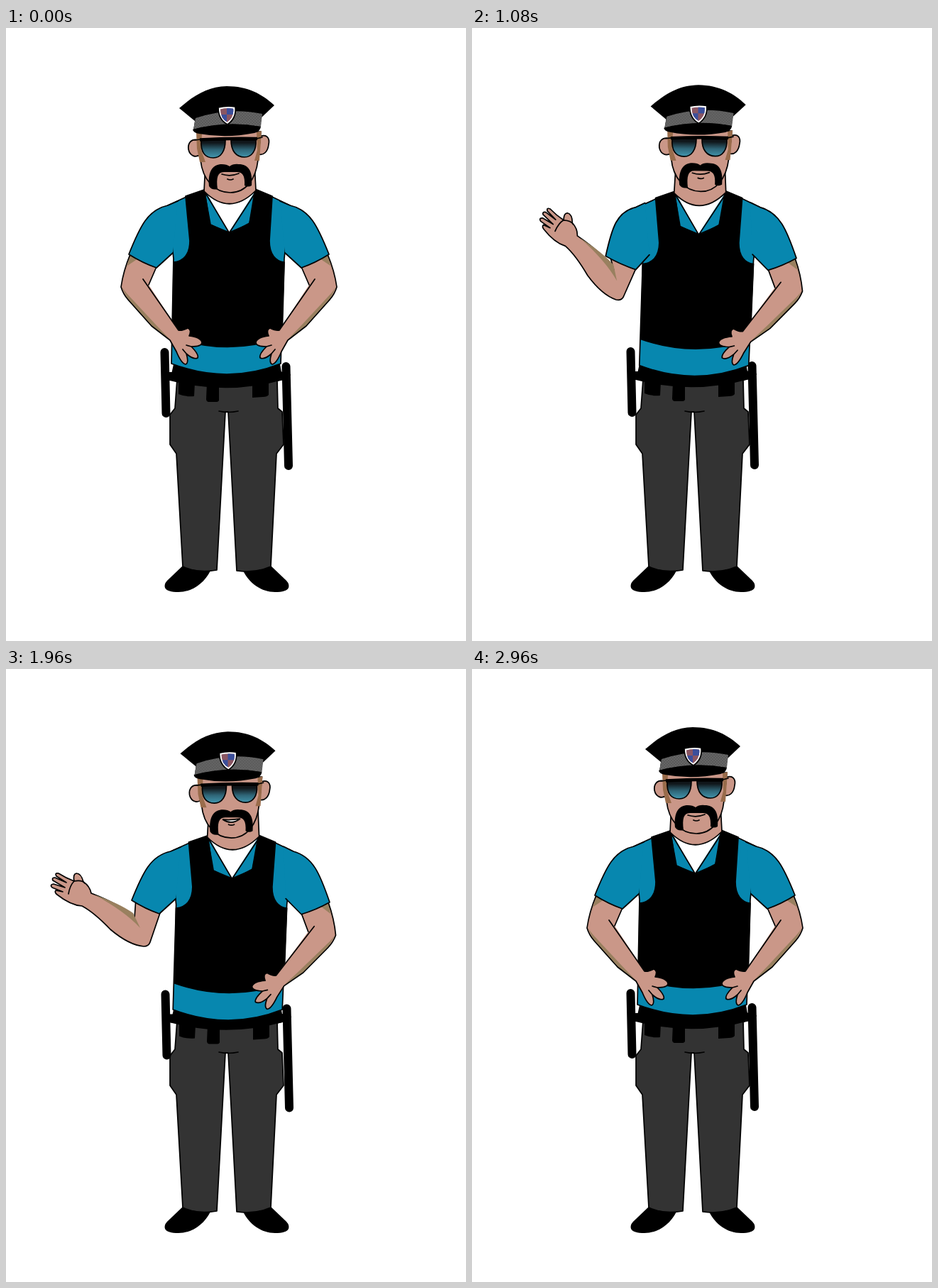
These frames come from a looping animation (648x864 px, 3 s). An HTML page:

```html
<!DOCTYPE html>
<html lang="en">
<head>
<meta charset="utf-8">
<title>Officer</title>
<style>
  html, body { margin: 0; width: 100%; height: 100%; overflow: hidden; background: #fff; }
  svg { display: block; width: 648px; height: 864px; }
  .line { stroke: #000; stroke-width: 1.7; stroke-linejoin: round; stroke-linecap: round; }
  .skin { fill: #ca9788; }
  .shade { fill: #99805f; }
  .shirt { fill: #0787af; }
  .hair { fill: #996c4b; }
  .open { fill: none; }
  .bar { stroke: #000; stroke-width: 12; stroke-linecap: round; fill: none; }
</style>
</head>
<body>
<svg viewBox="0 0 648 864">
  <defs>
    <linearGradient id="lens" x1="0" y1="0" x2="0" y2="1">
      <stop offset="0.15" stop-color="#10161a"/>
      <stop offset="0.55" stop-color="#2f6577"/>
      <stop offset="1" stop-color="#4398b0"/>
    </linearGradient>
    <pattern id="weave" width="4" height="4" patternUnits="userSpaceOnUse">
      <rect width="4" height="4" fill="#666"/>
      <path d="M0 0h2v2h-2zM2 2h2v2h-2z" fill="#5a5a5a"/>
    </pattern>
    <path id="shield" d="M299 112Q311 109 323 111Q325 127 312 136Q299 129 299 112Z"/>
    <clipPath id="crest"><use href="#shield" transform="translate(311 122) scale(.76) translate(-311 -122)"/></clipPath>
  </defs>

  <g id="legs">
    <path id="shoe" d="M250 757L229 777Q222 783 224 789Q227 795 243 795C262 795 279 783 288 765Z"/>
    <use href="#shoe" transform="translate(622 0) scale(-1 1)"/>
    <path class="line" fill="#333" d="M241 495L238 536L231 545V587L240 600L249 759Q270 769 297 764L309 541H313L325 765Q350 769 373 759L381 600L391 587L389 541L383 536L382 495Z"/>
    <path class="line open" d="M300 540Q313 543 327 540"/>
  </g>

  <g id="belt">
    <path d="M236 474L231 497Q312 518 390 496L386 474Z"/>
    <path d="M243 497L266 500L265 519Q252 520 243 516ZM283 500H300V525Q299 527 297 527H285Q282 526 282 523ZM347 500L370 497V517Q368 520 362 520L347 521Z"/>
    <path class="bar" d="M223.5 457L225.5 543M226 491H240M394.5 477L398 617M382 492L395 489"/>
  </g>

  <g id="torso">
    <path class="shirt line" d="M279 229L254 238L228 250L236 325L233 473Q312 503 387 473L392 325L400 250L375 238L351 229Z"/>
    <path fill="#fff" d="M281 230L314 288L351 230Z"/>
    <path class="shirt line" d="M280 231L287 277L314 288ZM352 231L343 276L315 288Z"/>
    <path class="line" d="M253 237L279 228L288 277L311 288H319L343 275L351 227L375 237L371 300C371 319 380 329 392 330L389 436Q312 463 235 436L236 330C250 329 259 319 259 300Z"/>
    <path class="skin line" d="M281 190L279 230Q315 266 352 229L350 190Z"/>
  </g>

  <g id="head">
    <path class="skin line" d="M272 158C260 155 256 163 257 171C259 180 267 184 274 178ZM358 153C367 149 372 155 370 164C369 174 363 180 356 178Z"/>
    <path class="skin line" d="M270 146L274 186C277 214 294 232 316 232C338 232 352 213 355 186L359 146Z"/>
    <path class="hair" d="M268 147L276 148L275 172L281 189L273 189L269 170ZM353 147L360 145L357 187L350 187L354 172Z"/>
    <path class="line" fill="url(#lens)" d="M275 158H309C309 173 303 183 292 183C280 183 274 175 275 158ZM317 158H352C353 173 346 182 336 182C324 182 317 173 317 158Z"/>
    <path class="line open" d="M266 158L274 157M353 156L361 154"/>
    <path stroke="#000" stroke-width="4.5" fill="none" d="M273 157.500Q314 155 354 156"/>
    <path d="M286 223C284 201 292 192 304 192Q311 192 315 195Q320 191 328 192C341 192 348 201 346 222Q341 225 336 222C337 208 333 203 325 203H307C298 203 296 211 298 227Q290 229 286 223Z"/>
    <path id="mouth" class="line" fill="#fff"/>
    <path class="line open" d="M312 213Q316 215 320 213"/>
    <path d="M244 113C267 93 285 83 311 82C340 82 361 93 378 109L360 126L358 140Q311 130 264 144L266 131Z"/>
    <path fill="url(#weave)" d="M267 127Q314 111 361 121L359 139Q311 131 264 143Z"/>
    <path d="M263 143Q311 130 359 139Q358 146 350 148Q310 156 272 149Q264 148 263 143Z"/>
    <use href="#shield" fill="#fff" class="line"/>
    <g clip-path="url(#crest)">
      <path fill="#8a5663" d="M298 110h26v28h-26z"/>
      <path fill="#3b4f9b" d="M311 110h14v12h-14zM298 122h13v14h-13z"/>
    </g>
  </g>

  <g id="raised">
    <path class="skin line"/>
    <path class="shade"/>
    <path class="line open"/>
  </g>
  <g id="left" class="arm"></g>
  <g id="right" class="arm"></g>
</svg>

<script>
const LOOP = 3000, STEP = 40;
const $ = id => document.getElementById(id);

for (const arm of document.querySelectorAll('.arm')) arm.innerHTML = `
  <g class="fore">
    <path class="skin" d="M177 312C167 338 164 351 162 365Q165 375 172 383L205 420L231 440L240 456Q247 473 253 474Q258 472 254 459Q264 468 270 465Q272 460 261 449Q276 449 276 443Q274 436 258 434Q262 425 256 423Q248 427 243 426L201 362L214 332Z"/>
    <path class="shade" d="M175 319L186 325L171 335L166 352ZM163 365L170 374L209 416L231 439L205 420L172 383Z"/>
    <path class="line open" d="M175 319C167 338 164 351 162 365Q165 375 172 383L205 420L231 440L240 456Q247 473 253 474Q258 472 254 459L249 453M254 459Q264 468 270 465Q272 460 261 449L254 447M261 449Q276 449 276 443Q274 436 258 434Q262 425 256 423Q248 427 243 426L193 354M201 362L214 332"/>
  </g>
  <path class="shirt line" d="M242 244L228 250C200 256 189 279 173 319Q192 331 212 338L235 317"/>`;

const FOREARM = 'M182 344Q165 326 121 309Q119 299 110 293Q107 281 100 281Q95 282 97 292Q86 288 75 281Q69 280 72 285L86 294L70 287Q65 287 67 291L84 301L68 296Q62 297 66 301L81 307L71 305Q69 308 73 311Q92 326 108 327Q125 336 148 360Q174 382 195 384Q202 384 204 378';
const FOREARM_SHADE = 'M125 311Q160 323 180 337L190 358Q168 334 125 311Z';
const PALM = 'M97 292Q91 298 89 310M97 292Q108 290 112 295';

// Smooth step from 0 to 1, and a smooth bump of height 1.
function ramp(t, from, to) {
  const u = Math.min(1, Math.max(0, (t - from) / (to - from)));
  return u * u * (3 - 2 * u);
}
const pulse = (t, peak, reach) => ramp(t, peak - reach, peak) - ramp(t, peak, peak + reach);

const place = (d, map) =>
  d.replace(/(-?[\d.]+) (-?[\d.]+)/g, (_, x, y) => map(+x, +y).map(v => v.toFixed(2)).join(' '));
const move = (node, value) => node.setAttribute('transform', value);

function drawRaised(t, lift, sink, sleeve) {
  const swing = pulse(t, 1080, 360), settle = pulse(t, 2560, 400);
  const turn = (115 * (lift - 1) + 13.4 * swing - 8 * settle) * Math.PI / 180;
  const size = 1 - lift * (1 - lift);
  const c = Math.cos(turn) * size, s = Math.sin(turn) * size;
  const ex = 181 + 13 * lift + 9 * swing + 11 * settle;
  const ey = 373 + 10 * lift + 8 * sink + 4 * settle;
  const fore = (x, y) => [ex + (x - 195) * c - (y - 384) * s, ey + (x - 195) * s + (y - 384) * c];

  const [skin, shade, palm] = $('raised').children;
  const outline = place(FOREARM, fore).replace('M', 'L');
  skin.setAttribute('d', `M${place('179 316', sleeve)}${outline}L${place('214 334', sleeve)}`);
  shade.setAttribute('d', place(FOREARM_SHADE, fore));
  palm.setAttribute('d', place(PALM, fore));
}

function draw(t) {
  const hold = 1 - ramp(t, 2600, 2940);
  const lean = ramp(t, 600, 960) * hold;
  const drop = ramp(t, 600, 1400) * hold;
  const sink = ramp(t, 1350, 1950) * hold;
  const lift = ramp(t, 600, 1000) - ramp(t, 2580, 2860);
  const nod = pulse(t, 500, 300), sway = pulse(t, 1060, 700);

  const hx = 7 * sway - 5.5 * nod + 1.5 * sink;
  const hy = 6.2 * sink - 1.8 * pulse(t, 980, 460);
  const turn = .8 * sway - 1.2 * nod;
  const bx = 4 * lean + pulse(t, 1080, 300) - 2 * nod;
  const by = 4 * drop + 3 * sink + nod / 2;
  const slant = .18 * pulse(t, 1080, 480) + .11 * pulse(t, 2560, 300) - .13 * pulse(t, 650, 120);
  const isRaised = lift > .15;
  const isTalking = pulse(t, 520, 100) + pulse(t, 1960, 100) > .3;

  move($('head'), `translate(${hx} ${hy}) rotate(${turn} 315 160)`);
  move($('torso'), `matrix(1 0 ${-bx / 412} 1 ${bx * 700 / 412} ${by})`);
  move($('belt'), `translate(${sink} ${2.5 * sink - lean})`);
  $('mouth').setAttribute('d', `M304 206Q316 ${isTalking ? 207 : 210} 328 205Q316 ${isTalking ? 214 : 210} 304 206Z`);

  move($('left'), `matrix(1 0 ${slant} 1 ${bx - slant * 262} ${by})`);
  const hip = $('left').querySelector('.fore');
  move(hip, `rotate(${200 * lift} 175 362)`);
  hip.style.display = isRaised ? 'none' : '';
  $('raised').style.display = isRaised ? '' : 'none';
  if (isRaised) drawRaised(t, lift, sink, (x, y) => [x + bx + slant * (y - 262), y + by]);

  move($('right'), `translate(${628 + bx} ${by}) scale(-1 1) rotate(${-3 * lean} 228 262)`);
}

const start = performance.now();
function tick() {
  const t = (performance.now() - start) % LOOP;
  draw(t < 120 ? 0 : Math.floor(t / STEP) * STEP);
  requestAnimationFrame(tick);
}
tick();
</script>
</body>
</html>
```
